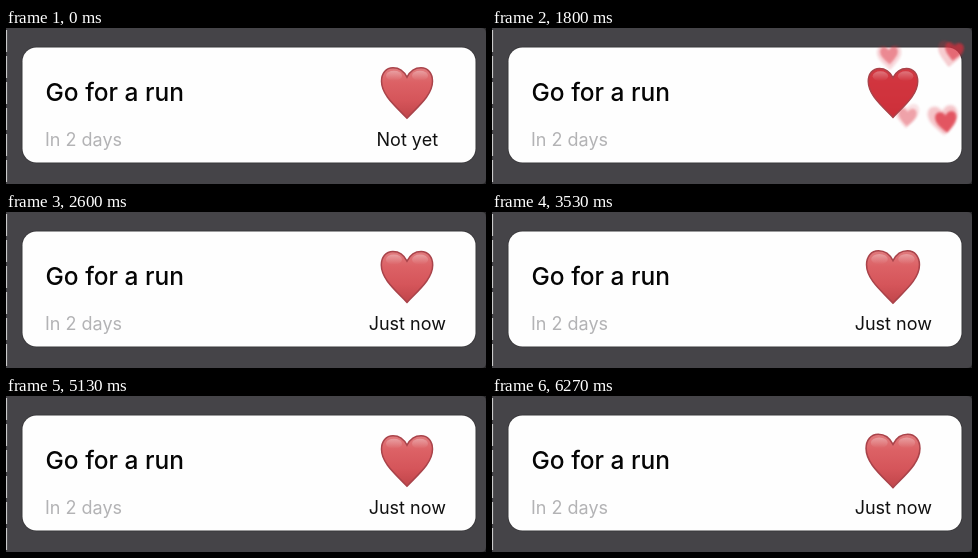
Write an HTML page that moves like this. It is 480 px wide and 156 px high and loops after 6340 ms.

```html
<!DOCTYPE html>
<html lang="en">
<head>
<meta charset="utf-8">
<title>Habit card</title>
<style>
  html, body { margin: 0; width: 100%; height: 100%; overflow: hidden; background: #2a292b; }
  svg { display: block; width: 480px; height: 156px; }
  text { font-family: Inter, Roboto, sans-serif; font-size: 18px; fill: #111; }
  .title { font-size: 24.5px; font-weight: 500; fill: #050505; }
  .due { fill: #b3b3b5; }
  .status { text-anchor: middle; }
</style>
</head>
<body>
<svg viewBox="0 0 480 156">
  <defs>
    <linearGradient id="body" x1="0" y1="0" x2="0" y2="1">
      <stop offset="0" stop-color="#e07a7d"/>
      <stop offset=".3" stop-color="#dc6165"/>
      <stop offset=".65" stop-color="#d5555a"/>
      <stop offset="1" stop-color="#c0454a"/>
    </linearGradient>
    <linearGradient id="gloss" x1="0" y1="0" x2="0" y2="1">
      <stop offset="0" stop-color="#fff" stop-opacity=".3"/>
      <stop offset="1" stop-color="#fff" stop-opacity="0"/>
    </linearGradient>
    <path id="shape" d="M0-15.5C-3-21.5-8-25-14-25C-21-25-25.5-19.5-25.5-11.5C-25.5 2-12 13 0 25.5C12 13 25.5 2 25.5-11.5C25.5-19.5 21-25 14-25C8-25 3-21.5 0-15.5Z"/>
    <filter id="soft" x="-30%" y="-30%" width="160%" height="160%">
      <feGaussianBlur stdDeviation="2.5"/>
    </filter>
  </defs>

  <path d="M0 0H475Q480 0 480 5V151Q480 156 475 156H0Z" fill="#454448"/>
  <path d="M.5 2V154" stroke="#c9c9ca" stroke-width="1.2" stroke-dasharray="22 4"/>
  <rect x="16.5" y="19.5" width="453" height="115" rx="14" fill="#fefefe" stroke="#39383b" stroke-width="2" paint-order="stroke"/>
  <text class="title" x="39.5" y="73">Go for a run</text>
  <text class="due" x="39" y="118">In 2 days</text>
  <text class="status" id="before" x="401.3" y="118">Not yet</text>
  <text class="status" id="after" x="401.3" y="118">Just now</text>
  <g id="burst" fill="#dc2f3d" filter="url(#soft-none)"></g>
  <g id="heart">
    <use href="#shape" fill="url(#body)"/>
    <use id="vivid" href="#shape" fill="#cf2a35"/>
    <ellipse cx="-13" cy="-17" rx="8" ry="5" fill="url(#gloss)"/>
    <ellipse cx="13" cy="-17" rx="8" ry="5" fill="url(#gloss)"/>
    <use href="#shape" fill="none" stroke="#a9434a" stroke-width="1.5"/>
  </g>
</svg>
<script>
const LOOP = 6340, CX = 401, CY = 64.7;
const $ = id => document.getElementById(id);
const clamp = v => Math.min(1, Math.max(0, v));
const smooth = u => (1 - Math.cos(Math.PI * u)) / 2;
const easeOut = u => 1 - (1 - u) ** 3;

// Interpolates [time, value] steps with a soft ease.
function track(steps, t) {
  if (t <= steps[0][0]) return steps[0][1];
  for (let i = 1; i < steps.length; i++) {
    const [t0, a] = steps[i - 1], [t1, b] = steps[i];
    if (t <= t1) return a + (b - a) * smooth((t - t0) / (t1 - t0));
  }
  return steps[steps.length - 1][1];
}

const scale = [
  [1500, 1], [1620, .92], [1800, .97], [2200, 1.08], [2700, 1],
  [3210, 1], [3880, 1.08], [4580, 1],
  [5340, 1], [6010, 1.08], [6710, 1]
];
const fadeOut = [[1530, 1], [1700, 0]];
const fadeIn = [[1880, 0], [2110, 1]];
const tint = [[1530, 0], [1700, .8], [1850, .8], [2250, 0]];

// dx, dy, size, tilt, opacity
const bits = [
  [-4, -39, .45, -4, .6],
  [64, -43, .47, 8, .8],
  [15, 26, .46, 4, .45],
  [56, 31, .54, -6, .95]
];
// lag, relative size, opacity: a pale halo under a denser core
const layers = [[40, 1.15, .3], [0, .8, .8]];

$("burst").removeAttribute("filter");
const burst = bits.flatMap(bit => layers.map(layer => {
  const el = document.createElementNS("http://www.w3.org/2000/svg", "use");
  el.setAttribute("href", "#shape");
  el.setAttribute("filter", "url(#soft)");
  $("burst").append(el);
  return { el, bit, layer };
}));

function place(el, x, y, s, tilt = 0) {
  el.setAttribute("transform", `translate(${x} ${y}) rotate(${tilt}) scale(${s})`);
}

function draw(t) {
  place($("heart"), CX, CY, track(scale, t));
  $("vivid").style.opacity = track(tint, t);
  $("before").style.opacity = track(fadeOut, t);
  $("after").style.opacity = track(fadeIn, t);

  const fade = t < 1560 ? 0 : 1 - smooth(clamp((t - 1760) / 460));
  $("burst").style.opacity = fade;
  for (const { el, bit: [dx, dy, size, tilt, alpha], layer: [lag, grow, density] } of burst) {
    const p = easeOut(clamp((t - lag - 1560) / 380));
    place(el, CX + dx * p, CY + dy * p, size * grow * (.4 + .6 * p), tilt * p);
    el.style.opacity = alpha * density;
  }
}

function tick() {
  draw(performance.now() % LOOP);
  requestAnimationFrame(tick);
}
tick();
</script>
</body>
</html>
```
